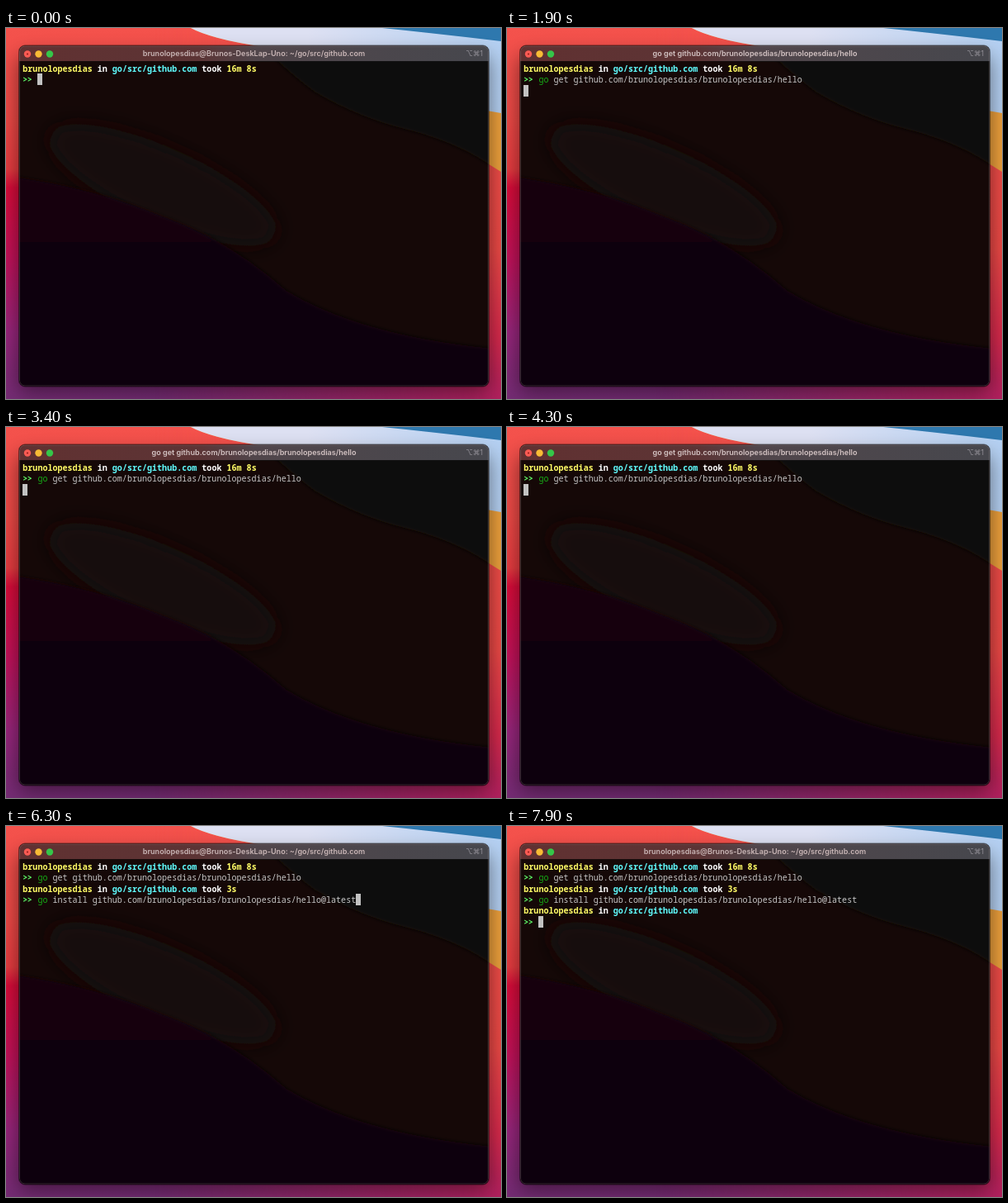
Recreate the animation shown at these times as an HTML page. Size 600x449 px, loop 8 s.

```html
<!DOCTYPE html>
<html lang="en">
<head>
<meta charset="utf-8">
<title>Terminal</title>
<style>
html, body { margin: 0; width: 100%; height: 100%; overflow: hidden; background: #a01c48; }
#stage { position: relative; width: 600px; height: 449px; overflow: hidden; }
svg { position: absolute; left: 0; top: 0; }
#title { position: absolute; left: 16px; top: 22px; width: 569px; height: 18px; text-align: center;
  font: 600 9.1px/18px Inter, sans-serif; color: #c9b6b6; white-space: pre; }
#title.busy { color: #d3c3c3; }
#screen { position: absolute; left: 20.3px; top: 42.6px; margin: 0; color: #c7c7c7;
  font: 10.05px/13.45px "Noto Sans Mono", "DejaVu Sans Mono", monospace; font-variant-ligatures: none; }
b { color: #fff; font-weight: 800; }
.user { color: #fffc67; }
.dir { color: #60fdff; }
.arrow { display: inline-block; width: 2ch; letter-spacing: -.5px; color: #5ffa68; }
.cmd { color: #16ac16; }
.hint { color: #666; }
.cursor { background: #c2c2c2; color: #777; }
</style>
</head>
<body>
<div id="stage">
<svg width="600" height="449" viewBox="0 0 600 449">
  <defs>
    <linearGradient id="left" x2="0" y2="1">
      <stop offset="0" stop-color="#f4524c"/><stop offset=".25" stop-color="#ee4946"/>
      <stop offset=".38" stop-color="#e73c40"/><stop offset=".43" stop-color="#d90c3a"/>
      <stop offset=".62" stop-color="#c2125a"/><stop offset=".82" stop-color="#98267c"/>
      <stop offset="1" stop-color="#742c74"/>
    </linearGradient>
    <linearGradient id="right" x2="0" y2="1">
      <stop offset="0" stop-color="#f4524c"/><stop offset=".6" stop-color="#ec4a46"/>
      <stop offset=".83" stop-color="#d82a4c"/><stop offset="1" stop-color="#b0205e"/>
    </linearGradient>
    <linearGradient id="fade">
      <stop offset=".3" stop-color="#fff" stop-opacity="0"/><stop offset="1" stop-color="#fff"/>
    </linearGradient>
    <mask id="side"><rect width="600" height="449" fill="url(#fade)"/></mask>
    <linearGradient id="sky">
      <stop offset=".38" stop-color="#dde0f2"/><stop offset="1" stop-color="#b4d0f2"/>
    </linearGradient>
    <linearGradient id="bar">
      <stop offset="0" stop-color="#613131"/><stop offset=".38" stop-color="#5c3435"/>
      <stop offset=".5" stop-color="#51464b"/><stop offset="1" stop-color="#46474d"/>
    </linearGradient>
    <linearGradient id="dusk" x2="0" y2="1">
      <stop offset="0" stop-color="#150107"/><stop offset="1" stop-color="#0a0009"/>
    </linearGradient>
    <filter id="blur" x="-20%" y="-20%" width="140%" height="140%"><feGaussianBlur stdDeviation="12"/></filter>
    <filter id="soft"><feGaussianBlur stdDeviation="2"/></filter>
    <clipPath id="win"><rect x="16" y="21.5" width="569" height="412" rx="7"/></clipPath>
  </defs>
  <rect width="600" height="449" fill="url(#left)"/>
  <rect width="600" height="449" fill="url(#right)" mask="url(#side)"/>
  <path d="M224 0Q250 14 320 24L480 100L600 174V0Z" fill="#eda03c"/>
  <path d="M224 0Q250 14 320 24L440 75L600 103V0Z" fill="url(#sky)"/>
  <path d="M456 0Q525 7 600 16V0Z" fill="#2e78ae"/>
  <rect x="14" y="33" width="573" height="408" rx="10" fill="#000" opacity=".45" filter="url(#blur)"/>
  <g clip-path="url(#win)">
    <rect x="16" y="21" width="569" height="413" fill="#150807"/>
    <ellipse cx="190" cy="190" rx="150" ry="45" transform="rotate(24 190 190)" fill="#160c08" filter="url(#blur)"/>
    <g filter="url(#soft)">
      <path d="M325 36Q350 60 375 78Q430 110 490 124Q550 140 590 168V36Z" fill="#110c07"/>
      <path d="M325 36Q370 70 440 82Q520 92 590 104V36Z" fill="#090909"/>
      <path d="M10 180Q110 194 190 228Q270 256 340 318Q430 372 590 388V440H10Z" fill="url(#dusk)"/>
    </g>
    <rect x="16" y="21" width="569" height="19.5" fill="url(#bar)"/>
    <path d="M16 40.5H585" stroke="#000" stroke-opacity=".6"/>
    <rect x="16.5" y="22" width="568" height="411" rx="6.5" fill="none" stroke="#a09090" stroke-opacity=".3"/>
  </g>
  <rect x="15.5" y="21" width="570" height="413" rx="7.5" fill="none" stroke="#000" stroke-opacity=".5"/>
  <circle cx="26" cy="31.5" r="4.2" fill="#fb5b53"/>
  <circle cx="26" cy="31.5" r="1.1" fill="#9a211c"/>
  <circle cx="39.5" cy="31.5" r="4.2" fill="#f8bb35"/>
  <circle cx="53" cy="31.5" r="4.2" fill="#35c649"/>
  <text x="578" y="34" text-anchor="end" font-family="Inter, 'DejaVu Sans', sans-serif" font-size="8.5" fill="#96939a">⌥⌘1</text>
</svg>
<div id="title"></div>
<pre id="screen"></pre>
</div>
<script>
const LOOP = 8000, KEY = 100, KEYS = 4;
const user = "brunolopesdias";
const repo = `github.com/${user}/${user}/hello`;
const getCmd = `go get ${repo}`;
const installCmd = `go install ${repo}@latest`;
const idleTitle = `${user}@Brunos-DeskLap-Uno: ~/go/src/github.com`;

// Times: first key, accepted suggestion, enter, command finished
const jobs = [
  { cmd: getCmd, type: 350, accept: 1200, run: 1700, done: 4700, took: "3s" },
  { cmd: installCmd, type: 5050, accept: 5900, run: 6600, done: 7300, took: "" },
];
const titleBox = document.getElementById("title");
const screenBox = document.getElementById("screen");

const span = (cls, text) => `<span class="${cls}">${text}</span>`;
const cursor = (ch = " ") => span("cursor", ch);
const arrow = `<b class="arrow">&gt;&gt;</b> `;
const paint = typed => span("cmd", typed.slice(0, 2)) + typed.slice(2);

function header(took) {
  const time = took ? ` took <b class="user">${took}</b>` : "";
  return `<b><b class="user">${user}</b> in <b class="dir">go/src/github.com</b>${time}</b>\n${arrow}`;
}

function inputLine(job, t) {
  if (t >= job.accept) return paint(job.cmd) + cursor();
  const n = Math.max(0, Math.min(KEYS, Math.floor((t - job.type) / KEY)));
  if (!n) return cursor();
  const typed = job.cmd.slice(0, n);
  const match = getCmd.startsWith(typed) ? getCmd : job.cmd;
  return paint(typed) + cursor(match[n]) + span("hint", match.slice(n + 1));
}

function show(text, title = idleTitle) {
  screenBox.innerHTML = text;
  titleBox.textContent = title;
  titleBox.className = title === idleTitle ? "" : "busy";
}

function render(t) {
  let text = header("16m 8s");
  for (const job of jobs) {
    if (t < job.run) return show(text + inputLine(job, t));
    text += paint(job.cmd) + "\n";
    if (t < job.done) return show(text + cursor(), job.cmd);
    text += header(job.took);
  }
  show(text + cursor());
}

const start = performance.now();
function tick() {
  render((performance.now() - start) % LOOP);
  requestAnimationFrame(tick);
}
tick();
</script>
</body>
</html>
```
